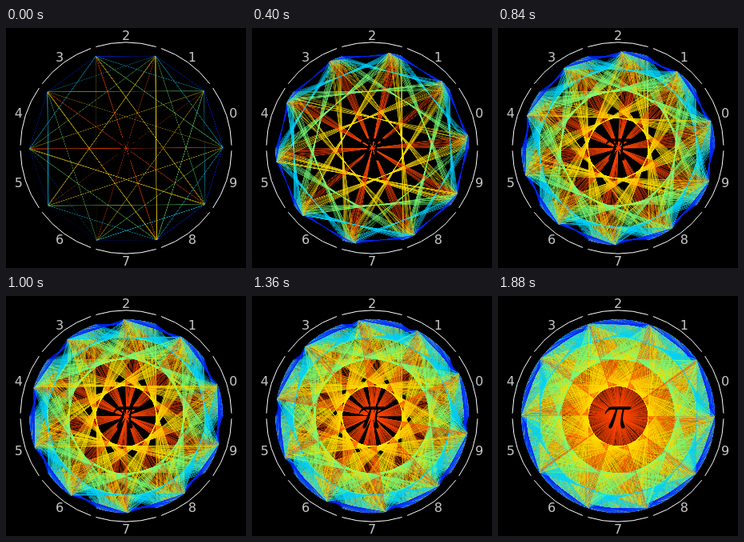
These frames come from a looping animation (300x300 px, 1.92 s). An HTML page with a canvas:

```html
<!DOCTYPE html>
<html lang="en">
<head>
<meta charset="utf-8">
<title>Digits of pi as chords</title>
<style>
  html, body { margin: 0; width: 100%; height: 100%; overflow: hidden; background: #000; }
  canvas { display: block; width: 300px; height: 300px; }
</style>
</head>
<body>
<canvas id="stage" width="300" height="300"></canvas>
<script>
const SIZE = 300, MID = 150;
const STEPS = 48, STEP_MS = 40, TOTAL = 10000;
const CHORD_R = 121, RING_R = 132, LABEL_R = 141;
const SECTOR = Math.PI / 5;
// One colour for each distance between two digits on the ring
const COLORS = ['', '0,43,255', '0,212,255', '124,255,123', '255,222,0', '255,73,0'];
const ALPHA = 0.27;
const FINE = 2; // chords are drawn larger and sampled down, which keeps them crisp

const stage = document.getElementById('stage').getContext('2d');
stage.imageSmoothingEnabled = false;

function layer(scale) {
  const c = document.createElement('canvas');
  c.width = c.height = SIZE * scale;
  const g = c.getContext('2d');
  g.scale(scale, scale);
  return g;
}

const chords = layer(FINE);
const overlay = layer(1);

// Machin's formula in fixed-point integers
function piDigits(count) {
  const unit = 10n ** BigInt(count + 10);
  const arctanInv = x => {
    const sq = x * x;
    let term = unit / x, sum = term, n = 1n, sign = -1n;
    while (term > 0n) {
      term /= sq;
      n += 2n;
      sum += sign * (term / n);
      sign = -sign;
    }
    return sum;
  };
  const pi = 4n * (4n * arctanInv(5n) - arctanInv(239n));
  return Array.from(pi.toString().slice(0, count), Number);
}

const digits = piDigits(TOTAL + 1);

function polar(angle, r) {
  return [MID + r * Math.cos(angle), MID - r * Math.sin(angle)];
}

function anchor(i) {
  return polar((digits[i] + i / TOTAL) * SECTOR, CHORD_R);
}

function drawChord(i) {
  const gap = Math.abs(digits[i] - digits[i + 1]);
  const dist = Math.min(gap, 10 - gap);
  if (!dist) return;
  chords.strokeStyle = `rgba(${COLORS[dist]},${ALPHA})`;
  chords.beginPath();
  chords.moveTo(...anchor(i));
  chords.lineTo(...anchor(i + 1));
  chords.stroke();
}

function drawRing(g) {
  const trim = 0.025;
  g.strokeStyle = '#fff';
  g.lineWidth = 1;
  g.fillStyle = '#c4c4c4';
  g.font = '16px "DejaVu Sans", sans-serif';
  g.textAlign = 'center';
  g.textBaseline = 'alphabetic';
  for (let d = 0; d < 10; d++) {
    g.beginPath();
    g.arc(MID, MID, RING_R, -(d + 1) * SECTOR + trim, -d * SECTOR - trim);
    g.stroke();
    const [x, y] = polar((d + 0.5) * SECTOR, LABEL_R);
    g.fillText(d, x, y + 5.6);
  }
}

function drawPi(g) {
  g.fillStyle = '#000';
  g.fill(new Path2D(`M133.3 147.2 C136 141.5 138.5 138.2 143 138.2
    L165 138.2 Q167 138.4 166.4 140.2 Q165.8 142 163.5 142
    L157.8 142 C156.3 149 155.7 153 156.6 157 C157.4 160.5 158.6 162 158.6 163.4
    Q158.4 165.8 156.2 165.8 C153.6 165.8 152.9 161.5 153.1 157.5
    C153.3 152.5 154.6 147 155.6 142 L149.4 142
    C147.4 150 145.4 158 142.9 163.5 Q141.8 165.8 140 165.8
    Q137.9 165.6 138.3 163.2 C138.7 161.4 140 159.2 141.3 156.2
    C143.3 151.5 145.5 146.5 146.9 142 L143 142
    C139.3 142 137.3 143.4 134.5 147.4 Z`));
}

drawRing(overlay);
drawPi(overlay);
chords.lineWidth = 1 / FINE;

let drawn = 0;

function render(step) {
  const goal = Math.round((step + 1) * TOTAL / STEPS);
  if (goal < drawn) drawn = 0;
  if (!drawn) {
    chords.fillStyle = '#000';
    chords.fillRect(0, 0, SIZE, SIZE);
  }
  while (drawn < goal) drawChord(drawn++);
  stage.drawImage(chords.canvas, 0, 0, SIZE, SIZE);
  stage.drawImage(overlay.canvas, 0, 0);
}

let start = null, shown = 0;

function tick(now) {
  if (start === null) start = now;
  const step = Math.floor(Math.max(0, now - start) / STEP_MS) % STEPS;
  if (step !== shown) render(shown = step);
  requestAnimationFrame(tick);
}

render(0);
requestAnimationFrame(tick);
</script>
</body>
</html>
```
